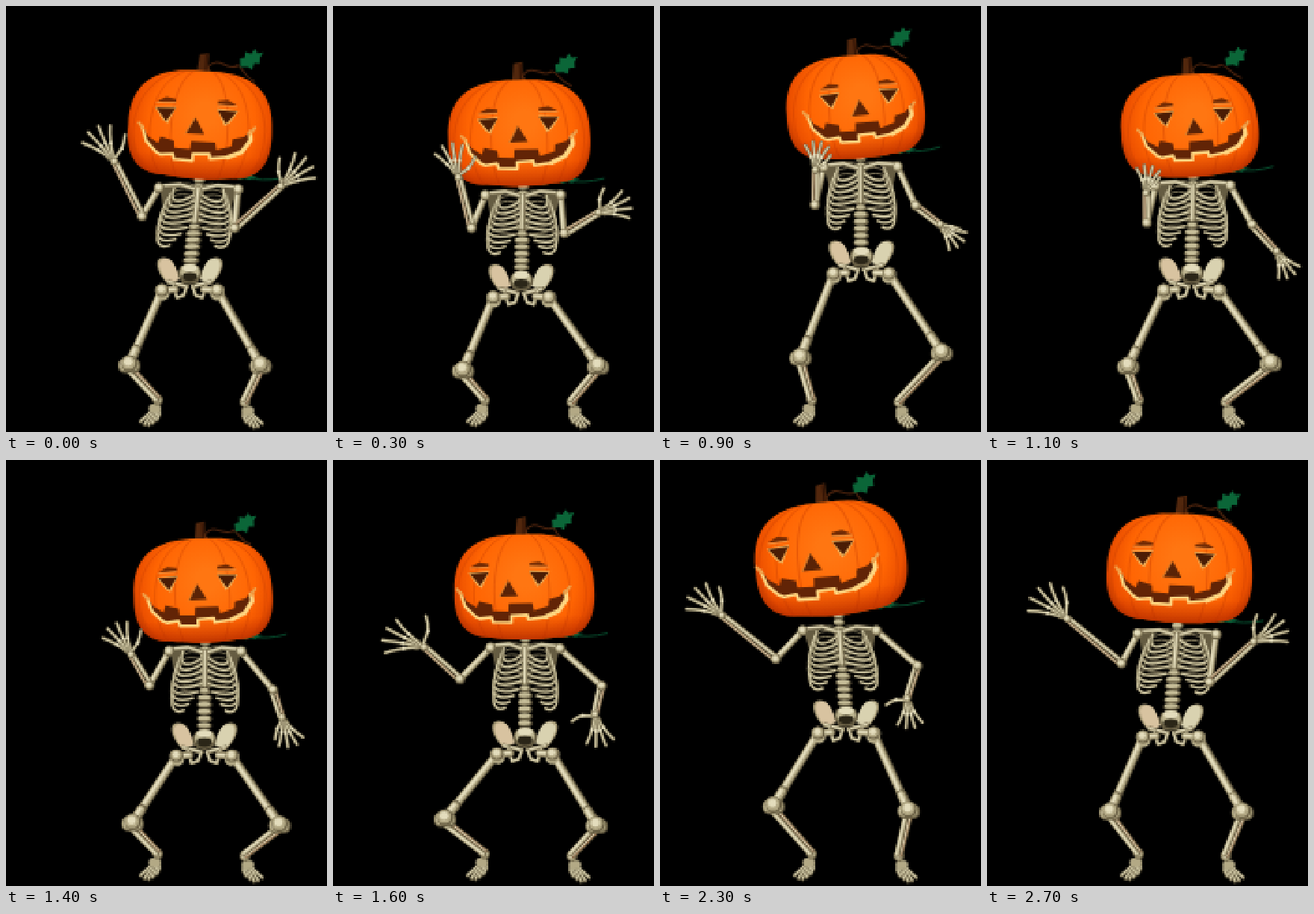
An HTML page with a canvas for the animation above (2800 ms loop, 430 px wide and 570 px high).

```html
<!DOCTYPE html>
<html lang="en">
<head>
<meta charset="utf-8">
<title>Dancing pumpkin skeleton</title>
<style>
html, body { margin: 0; width: 100%; height: 100%; overflow: hidden; background: #000; }
canvas { display: block; width: 100%; height: 100%; image-rendering: pixelated; }
</style>
</head>
<body>
<canvas id="stage" width="172" height="228"></canvas>
<script>
const ctx = document.getElementById('stage').getContext('2d');
const STEPS = 28, STEP_MS = 100;
const KEYS = [0, 3, 6, 8, 11, 14, 16, 19, 23, 27];
const DARK = '#6a6045', MID = '#b3a985', LIGHT = '#e3dcbc', TAN = '#94714f';
const RAD = Math.PI / 180;

// Cyclic spline through the poses; bounce poses are added between the first four.
function track(lift, ...rows) {
  const between = (a, b, dy) => a.map((v, i) => (v + b[i]) / 2 + dy * lift[i]);
  const [a, b, c, d, ...rest] = rows;
  const poses = [a, between(a, b, 12), b, between(b, c, -30), c, between(c, d, 10), d, ...rest];
  const n = KEYS.length;
  const time = i => KEYS[(i + n) % n] + STEPS * Math.floor(i / n);
  const pose = i => poses[(i + n) % n];
  const slope = (i, j) => (pose(i + 1)[j] - pose(i - 1)[j]) / (time(i + 1) - time(i - 1));
  return step => {
    let i = n - 1;
    while (KEYS[i] > step) i--;
    const span = time(i + 1) - time(i), u = (step - time(i)) / span;
    const s = u * u * (3 - 2 * u), p = u * (1 - u) * (1 - u) * span, q = u * u * (u - 1) * span;
    return pose(i).map((v, j) => v + (pose(i + 1)[j] - v) * s + slope(i, j) * p + slope(i + 1, j) * q);
  };
}

// x, y, tilt, face turn, width
const headAt = track([0, 1, 0, 0, 0],
  [260, 158, 3, -7, 193], [238, 156, -7, 4, 188], [271, 159, -4, 6, 184], [256, 169, -1, -22, 188],
  [212, 139, -7, -33, 190], [228, 131, -6, -25, 203], [258, 144, 2, -10, 195]);
// left shoulder, right shoulder, pelvis
const torsoAt = track([0, 1, 0, 1, 0, .9],
  [205, 243, 311, 245, 246, 355], [203, 239, 299, 236, 258, 352], [226, 240, 326, 240, 274, 355],
  [211, 251, 304, 252, 257, 368], [188, 234, 279, 223, 245, 345], [191, 228, 290, 228, 249, 340],
  [202, 232, 307, 233, 246, 345]);
// elbow, wrist, hand angle, hand length, thumb angle
const leftArmAt = track([0, 1, 0, 1, 0, 0, 0],
  [182, 281, 145, 208, -123, 54, 62], [189, 289, 191, 226, -95, 42, 70], [214, 290, 213, 250, -85, 38, 40],
  [170, 293, 122, 250, -162, 58, 85], [143, 275, 63, 227, -149, 58, 59], [155, 266, 83, 208, -143, 53, 53],
  [180, 272, 107, 212, -142, 58, 51]);
const rightArmAt = track([0, 1, 0, 1, 0, 0, 0],
  [306, 297, 368, 241, -40, 52, -60], [313, 287, 343, 287, 8, 40, -80], [355, 292, 388, 328, 60, 40, -10],
  [360, 302, 351, 340, 80, 45, 95], [355, 258, 352, 302, 67, 46, 93], [345, 275, 331, 319, 84, 41, 90],
  [298, 297, 357, 243, -26, 50, -65]);
const kneesAt = track([0, .5, 0, .5],
  [165, 479, 341, 480], [183, 482, 369, 470], [189, 481, 380, 477], [150, 479, 353, 488],
  [142, 463, 327, 468], [152, 462, 333, 468], [165, 470, 342, 470]);

function path(pts, close) {
  ctx.beginPath();
  pts.forEach(([x, y], i) => i ? ctx.lineTo(x, y) : ctx.moveTo(x, y));
  if (close) ctx.closePath();
}
function line(pts, width, color) {
  path(pts);
  ctx.lineWidth = width;
  ctx.strokeStyle = color;
  ctx.stroke();
}
function shape(pts, color) {
  path(pts, true);
  ctx.fillStyle = color;
  ctx.fill();
}
function oval(x, y, rx, ry, color, turn = 0) {
  ctx.beginPath();
  ctx.ellipse(x, y, rx, ry, turn, 0, 7);
  ctx.fillStyle = color;
  ctx.fill();
}
function curve(x0, y0, c, width, color) {
  ctx.beginPath();
  ctx.moveTo(x0, y0);
  ctx.bezierCurveTo(...c);
  ctx.lineWidth = width;
  ctx.strokeStyle = color;
  ctx.stroke();
}
function shaft(pts, w, mid = MID) {
  line(pts, w, DARK);
  line(pts.map(([x, y]) => [x - w * .08, y]), w * .74, mid);
  line(pts.map(([x, y]) => [x - w * .14, y - w * .05]), w * .36, LIGHT);
}
function knob(x, y, r) {
  oval(x, y, r, r, DARK);
  oval(x - r * .1, y - r * .1, r * .82, r * .82, MID);
  oval(x - r * .15, y - r * .2, r * .52, r * .52, LIGHT);
}
function pair(x1, y1, x2, y2, gap, w, tint) {
  const d = Math.hypot(x2 - x1, y2 - y1) || 1;
  const nx = (y1 - y2) / d * gap, ny = (x2 - x1) / d * gap;
  shaft([[x1 - nx, y1 - ny], [x2 - nx * .8, y2 - ny * .8]], w * .75, tint);
  shaft([[x1 + nx, y1 + ny], [x2 + nx * .8, y2 + ny * .8]], w);
}

function hand(x, y, angle, len, thumb) {
  const at = (a, r) => [x + Math.cos(a * RAD) * r, y + Math.sin(a * RAD) * r];
  const digit = (a, r, bend) => {
    const pts = [at(a * .6 + angle * .4, r * .1), at(a, r * .52), at(a + bend * .5, r * .78), at(a + bend, r)];
    line(pts, 4.6, DARK);
    line(pts, 2.9, '#cdc5a2');
    oval(...pts[1], 2.4, 2.4, LIGHT);
  };
  oval(...at(angle, len * .24), len * .2, 7, '#847a59', angle * RAD);
  for (let i = 0; i < 4; i++) digit(angle - 22 + i * 14.6, len * (1 - Math.abs(i - 1.4) * .06), (i - 1.5) * 3);
  digit(angle + thumb, len * .72, -thumb * .12);
  knob(x, y, 5);
}

function arm(sx, sy, [ex, ey, wx, wy, angle, len, thumb]) {
  shaft([[sx, sy], [ex, ey]], 9);
  knob(sx, sy, 7);
  pair(ex, ey, wx, wy, 3, 6, TAN);
  knob(ex, ey, 6.5);
  hand(wx, wy, angle, len, thumb);
}

function foot(x, y, side) {
  for (let i = 0; i < 5; i++) {
    const tx = x + side * (23 - i * 5.4), ty = y + 29 + 5 * Math.sin(i * .9);
    line([[x, y + 5], [x + side * (12 - i * 3.6), y + 19], [tx, ty]], 5, DARK);
    line([[x - 1, y + 6], [x + side * (12 - i * 3.6), y + 18], [tx, ty - 1]], 3, '#c9c19f');
  }
  oval(x + side * 4, y + 11, 8, 6, MID);
  knob(x, y, 7);
}

function leg(hx, hy, kx, ky, ax, ay, side) {
  foot(ax, ay, side);
  pair(kx, ky + 5, ax, ay - 2, 3.2, 7.5, TAN);
  shaft([[hx - side * 18, hy - 1], [hx, hy]], 10);
  shaft([[hx, hy], [kx, ky]], 11.5);
  shaft([[kx + (hx - kx) * .2, ky + (hy - ky) * .2], [kx, ky]], 13.5);
  oval(hx, hy + 3, 9, 11, MID, side * .4);
  knob(hx, hy, 8.5);
  knob(kx - 5, ky + 2, 10);
  knob(kx + 5, ky + 2, 10);
  knob(kx, ky - 1, 11);
}

function vertebra(y, w) {
  oval(0, y, w, 4.6, DARK);
  oval(-1, y - 1, w * .8, 3, '#c6bd98');
}

function torso([lx, ly, rx, ry, px, py]) {
  const mx = (lx + rx) / 2, my = (ly + ry) / 2;
  ctx.save();
  ctx.transform((rx - lx) / 104, (ry - ly) / 104, (px - mx) / 112, (py - my) / 112, mx, my);
  for (let y = -20; y < 104; y += 9) vertebra(y, y > 58 ? 11 : 8);
  for (const s of [-1, 1]) {
    shape([[s * 30, -4], [s * 52, -5], [s * 45, 25], [s * 36, 28]], '#655c42');
    for (let i = 0; i < 9; i++) {
      const w = 48 * Math.sin(.78 + i * .125), y = i * 7.2;
      curve(s * 5, y - 4, [s * w * .7, y - 11, s * w * 1.05, y - 2, s * w, y + 14], 2.2, '#81775a');
    }
    for (let i = 0; i < 9; i++) {
      const w = 49 * Math.sin(.78 + i * .125), y = i * 7.2;
      const inX = i < 5 ? 4 : 4 + (i - 4) * 6.5, inY = i < 5 ? 8 + i * 8.5 : 45 + (i - 4) * 8;
      const c = [s * w * 1.08, y + 16, s * w * .86, y + 25, s * inX, inY];
      curve(s * w * .94, y + 1, c, 4, DARK);
      curve(s * w * .94, y, c, 2.6, '#d0c8a4');
    }
    shaft([[s * 4, 1], [s * 24, -5], [s * 50, -3]], 5.5);
  }
  shaft([[0, 0], [0, 22], [0, 44]], 7);
  ctx.restore();
}

function pelvis(x, y) {
  ctx.save();
  ctx.translate(x, y);
  for (const s of [-1, 1]) {
    const wing = k => {
      ctx.beginPath();
      ctx.moveTo(s * 14 * k, 10);
      ctx.bezierCurveTo(s * 20, -8, s * 22, -18, s * 36 * k, -19 * k);
      ctx.bezierCurveTo(s * 50 * k, -18 * k, s * 44 * k, 2, s * 30 * k, 16);
      ctx.closePath();
    };
    wing(1);
    ctx.fillStyle = '#a99c77';
    ctx.fill();
    wing(.93);
    ctx.fillStyle = s < 0 ? '#d8c3a0' : '#d9d2b0';
    ctx.fill();
    shaft([[s * 28, 14], [s * 15, 17], [s * 4, 20]], 6);
    shaft([[s * 22, 17], [s * 17, 35], [s * 8, 32], [s * 4, 20]], 4.6);
  }
  oval(0, 3, 16, 14, DARK);
  oval(0, 1, 13, 11, '#bdb48f');
  oval(0, 7, 10, 6, '#2b2618');
  oval(0, -5, 10, 5, LIGHT);
  ctx.restore();
}

function pumpkinPath() {
  ctx.beginPath();
  ctx.moveTo(0, -71);
  ctx.bezierCurveTo(66, -74, 96, -50, 96, 5);
  ctx.bezierCurveTo(98, 46, 84, 70, 44, 70);
  ctx.bezierCurveTo(20, 74, -22, 73, -46, 69);
  ctx.bezierCurveTo(-84, 68, -98, 44, -96, 5);
  ctx.bezierCurveTo(-96, -50, -66, -74, 0, -71);
}

function leaf(x, y, w, h, turn, color) {
  ctx.save();
  ctx.translate(x, y);
  ctx.rotate(turn);
  ctx.scale(w / 2, h / 2);
  shape([[-1, .2], [-.75, -.6], [-.4, -.45], [-.2, -1], [.15, -.55], [.55, -.85], [.6, -.3], [1, -.1],
    [.6, .25], [.4, .8], [.05, .5], [-.3, 1], [-.5, .55]], color);
  ctx.restore();
}

function eye(x, y, s) {
  ctx.save();
  ctx.translate(x, y);
  ctx.scale(s, 1);
  shape([[-15, -9], [14, -11], [3, 12], [-4, 7]], '#f3b45c');
  shape([[-13, -8], [13, -9], [1, 9]], '#4b1d05');
  shape([[-12, -17], [0, -23], [13, -21], [13, -17], [-3, -16]], '#732b04');
  line([[-12, -15], [12, -16]], 1.6, '#ee9a48');
  ctx.restore();
}

function mouth() {
  const top = [[-73, 0], [-64, 15], [-50, 24], [-47, 15], [-29, 20], [-28, 29], [-7, 30], [-6, 19], [26, 19],
    [28, 29], [48, 23], [49, 14], [64, 10], [75, -2]];
  const low = [[73, 14], [62, 30], [44, 38], [20, 41], [19, 35], [-3, 36], [-3, 45], [-28, 44], [-30, 37],
    [-46, 39], [-52, 36], [-66, 22]];
  shape([...top, ...low], '#622406');
  line([[72, 4], ...low.slice(0, 3)], 6, '#ffd681');
  line([...low.slice(2), [-72, 3]], 4, '#ffd681');
  line([[-77, -2], [-71, 5]], 4, '#f0a14a');
  line([[78, -3], [71, 6]], 4, '#f0a14a');
}

function head([x, y, tilt, turn, width]) {
  ctx.save();
  ctx.translate(x, y);
  ctx.rotate(tilt * RAD);
  ctx.scale(width / 192, width / 192);

  curve(30, 71, [65, 60, 70, 76, 112, 66], 2.4, '#07452a');
  leaf(62, 66, 38, 11, .05, '#0a5a35');

  const sx = 2 + turn * .2, lx = 68 + turn * .6;
  curve(sx + 6, -77, [sx + 20, -94, sx + 30, -72, sx + 44, -80], 2.6, '#46200c');
  curve(sx + 44, -80, [lx - 14, -84, lx - 10, -66, lx + 5, -61], 2.6, '#46200c');
  leaf(lx, -90, 36, 25, -.5, '#0b6638');
  shape([[sx - 9, -67], [sx - 6, -93], [sx + 6, -95], [sx + 6, -78], [sx + 12, -67]], '#52270d');
  line([[sx + 3, -92], [sx + 3, -72]], 3, '#361606');

  pumpkinPath();
  const skin = ctx.createRadialGradient(8 + turn * .3, -14, 15, 0, -4, 104);
  skin.addColorStop(0, '#ff7612');
  skin.addColorStop(.62, '#ff6503');
  skin.addColorStop(.86, '#ec5000');
  skin.addColorStop(1, '#b93400');
  ctx.fillStyle = skin;
  ctx.fill();
  ctx.save();
  ctx.clip();
  for (const k of [-88, -66, -38, 38, 66, 88]) {
    const top = sx + k * .35, w = k + turn * .15;
    curve(top, -70, [w * 1.12, -50, w * 1.16, 38, w * .7, 74], 2.5, 'rgba(205,66,0,.42)');
  }
  const shadow = ctx.createLinearGradient(0, 40, 0, 73);
  shadow.addColorStop(0, 'rgba(190,45,0,0)');
  shadow.addColorStop(1, 'rgba(170,38,0,.75)');
  ctx.fillStyle = shadow;
  ctx.fillRect(-100, 40, 200, 35);
  ctx.restore();

  ctx.translate(turn, 4);
  eye(-40 - turn * .03, -15, 1);
  eye(42 - turn * .03, -15, -1);
  shape([[0, -13], [-12, 9], [13, 9]], '#5a2306');
  line([[-12, 9], [-1, -11]], 1.8, '#e88a32');
  ctx.translate(-turn * .3, 0);
  mouth();
  ctx.restore();
}

function draw(step) {
  ctx.setTransform(.4, 0, 0, .4, 0, 0);
  ctx.fillStyle = '#000';
  ctx.fillRect(0, 0, 430, 570);
  ctx.lineCap = ctx.lineJoin = 'round';
  const body = torsoAt(step), [lx, ly, rx, ry, px, py] = body;
  const [klx, kly, krx, kry] = kneesAt(step);
  torso(body);
  pelvis(px, py);
  leg(px - 37, py + 25, klx, kly, 203, 527, -1);
  leg(px + 37, py + 25, krx, kry, 320, 530, 1);
  head(headAt(step));
  arm(lx, ly, leftArmAt(step));
  arm(rx, ry, rightArmAt(step));
}

const start = performance.now();
let shown = -1;
function tick() {
  const step = Math.floor((performance.now() - start) / STEP_MS) % STEPS;
  if (step !== shown) draw(shown = step);
  requestAnimationFrame(tick);
}
tick();
</script>
</body>
</html>
```
